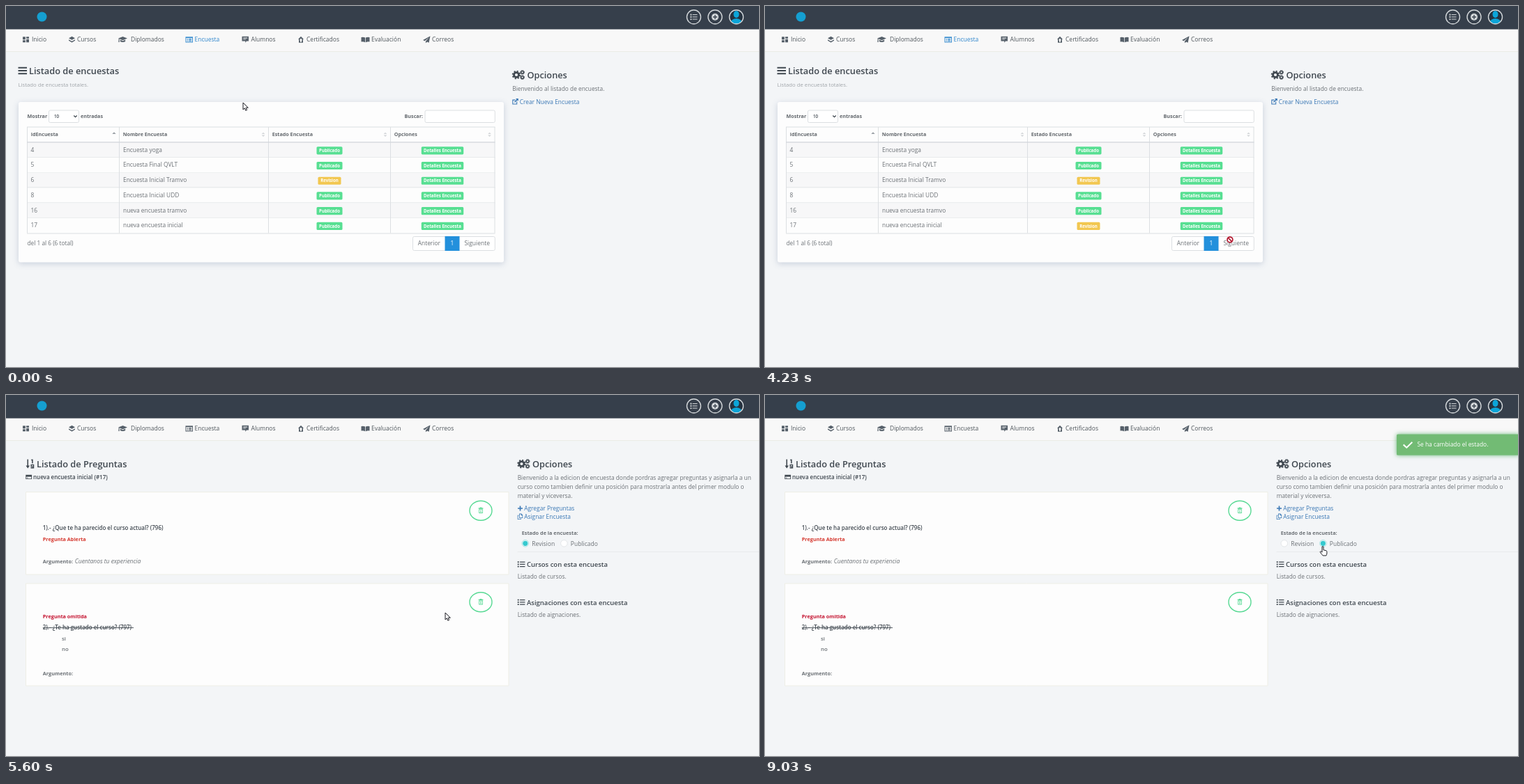
Write an HTML page with a canvas that moves like this. It is 1080 px wide and 519 px high and loops after 9960 ms.

```html
<!DOCTYPE html>
<html lang="es">
<head>
<meta charset="utf-8">
<title>Encuestas</title>
<style>
html, body { margin: 0; width: 100%; height: 100%; overflow: hidden; background: #f3f5f7; }
canvas { display: block; width: 1080px; height: 519px; }
</style>
</head>
<body>
<canvas id="stage"></canvas>
<script>
const W = 1080, H = 519, LOOP = 9960;
const canvas = document.getElementById('stage');
const ctx = canvas.getContext('2d');
const dpr = window.devicePixelRatio || 1;
canvas.width = W * dpr;
canvas.height = H * dpr;

const DARK = '#3f474f', BODY = '#6c7176', LABEL = '#63686d', LINK = '#3b78b5';
const GREEN = '#57df92', YELLOW = '#f2c750', RED = '#d5382f', LINE = '#dcdfe2';

// icon shapes on a 16 x 16 grid
const ICONS = {
  grid: 'M0 0h7v8H0zM9 0h7v5H9zM0 10h7v6H0zM9 7h7v9H9z',
  layers: 'M8 0l8 4.5-8 4.5-8-4.5zM0 8l8 4.5L16 8v2.5L8 15.5 0 10.500z',
  cap: 'M8 1l8 4-8 4.500-8-4.500zM3.500 8.500l4.500 2.500 4.500-2.500v4q-4.500 3-9 0zM.8 6h1.200v8H.4z',
  form: 'M0 1h16v14H0zM1.500 4v9.500h13V4zM3.500 5.500h2v1.500h-2zM7 5.500h6v1.500H7zM3.500 8h2v1.500h-2zM7 8h6v1.500H7zM3.500 10.500h2V12h-2zM7 10.500h6V12H7z',
  board: 'M0 0h16v12h-5l-3 4v-4H0zM3 3v1.600h10V3zM3 6.500v1.600h6V6.500z',
  house: 'M8 0l8 7h-2v9H2V7H0zM8 5l-3.500 3.500L6 12v2h4v-2l1.500-3.500z',
  book: 'M0 2q5-1 7.500 1v12q-3-2-7.500-1.500zM16 2q-5-1-7.500 1v12q3-2 7.500-1.500z',
  plane: 'M16 0L0 9l4 2 9-8-7 9v4l3-3 4 2z',
  bars: 'M0 1h16v2.600H0zM0 6.700h16v2.600H0zM0 12.400h16V15H0z',
  list: 'M0 1h3v3H0zM5 1.500h11v2H5zM0 6.500h3v3H0zM5 7h11v2H5zM0 12h3v3H0zM5 12.500h11v2H5z',
  edit: 'M0 3h8v2H2v9h9V9l2-1v8H0zM9 0h7v7l-2.400-2.400L7 11 5 9l6.400-6.400z',
  plus: 'M6.300 1h3.400v5.300H15v3.400H9.700V15H6.300V9.700H1V6.300h5.300z',
  copy: 'M5 0h7l4 4v8H5zM6.600 1.600v8.800h7.800V5H11V1.600zM0 4h4v1.600H1.600v8.800h7.800V13H11v3H0z',
  sort: 'M2.500 0h2v11h2.500l-3.500 5-3.500-5h2.500zM10 0h3v7h-2V2h-1zM9 9h6v7H9v-1.700h4V13.500H9zM10.700 10.500v1.500h2.500v-1.500z',
  card: 'M0 2h16v12H0zM1.600 7.500v4.900h12.800V7.500zM3 9.500h3V11H3z',
  trash: 'M5.500 0h5v1.500H15V4H1V1.500h4.500zM2 5h12v11H2zM3.700 6.700v7.600h8.600V6.700zM6 8h1.300v5H6zM8.700 8H10v5H8.700z',
  check: 'M1.500 7.500L6 12 14.500 3 16 5 6 15.500 0 9.500z'
};
for (const k in ICONS) ICONS[k] = new Path2D(ICONS[k]);

const ARROW = new Path2D('M0 0v10l2.300-2.100 1.500 3.400 1.800-.8-1.500-3.200h3.200z');
const HAND = new Path2D('M-1 .6q1-1 2 .1v4.600l4 1q1 .4.900 1.500v2.700q-.3 1.700-1 2.900H.2q-2.200-2.300-4-5.200q.2-1.300 1.500-.8l1.300 1.200z');

function text(s, x, y, size, color = BODY, weight = 400, align = 'left', style = '') {
  ctx.font = `${style} ${weight} ${size}px "Open Sans", "Noto Sans", sans-serif`;
  ctx.textAlign = align;
  ctx.fillStyle = color;
  ctx.fillText(s, x, y + size * 0.36);
}

function icon(name, x, y, w, h = w, color = '#56606a') {
  ctx.save();
  ctx.translate(x, y);
  ctx.scale(w / 16, h / 16);
  ctx.fillStyle = color;
  ctx.fill(ICONS[name], 'evenodd');
  ctx.restore();
}

function box(x, y, w, h, fill, stroke, r = 0) {
  ctx.beginPath();
  ctx.roundRect(x, y, w, h, r);
  if (fill) { ctx.fillStyle = fill; ctx.fill(); }
  if (stroke) { ctx.strokeStyle = stroke; ctx.lineWidth = 1; ctx.stroke(); }
}

function disc(x, y, r, fill, stroke, lw = 1, ry = r) {
  ctx.beginPath();
  ctx.ellipse(x, y, r, ry, 0, 0, Math.PI * 2);
  if (fill) { ctx.fillStyle = fill; ctx.fill(); }
  if (stroke) { ctx.strokeStyle = stroke; ctx.lineWidth = lw; ctx.stroke(); }
}

function tri(x, y, w, h, color) {
  ctx.fillStyle = color;
  ctx.beginPath();
  ctx.moveTo(x - w, y);
  ctx.lineTo(x + w, y);
  ctx.lineTo(x, y + h);
  ctx.fill();
}

function gear(x, y, r) {
  disc(x, y, r * 0.58, null, DARK, r * 0.46);
  ctx.save();
  const step = Math.PI * r * 0.9 * 2 / 16;
  ctx.setLineDash([step, step]);
  disc(x, y, r * 0.9, null, DARK, r * 0.3);
  ctx.restore();
}

function gears(x) {
  gear(x + 6, 99, 6);
  gear(x + 14.6, 95.3, 3.3);
  gear(x + 14.6, 102.6, 3.3);
  text('Opciones', x + 21.5, 99.3, 12.75, DARK, 600);
}

const NAV = [
  ['Inicio', 37, 'grid', 24, 9, 8],
  ['Cursos', 102, 'layers', 90, 9, 9],
  ['Diplomados', 179, 'cap', 161, 13, 10],
  ['Encuesta', 270.5, 'form', 257.5, 10.5, 9.5],
  ['Alumnos', 351.5, 'board', 338.5, 9.5, 9],
  ['Certificados', 431, 'house', 419, 8, 9],
  ['Evaluación', 524, 'book', 509.5, 12, 9],
  ['Correos', 611, 'plane', 598, 10.5, 10]
];

function chrome(active) {
  ctx.fillStyle = '#f3f5f7';
  ctx.fillRect(0, 0, W, H);
  ctx.fillStyle = '#f8f8f8';
  ctx.fillRect(0, 33, W, 32);
  ctx.fillStyle = '#ebece5';
  ctx.fillRect(0, 65, W, 1);
  ctx.fillStyle = '#363f4b';
  ctx.fillRect(0, 0, W, 33.5);
  disc(51.5, 15.5, 7, '#159fd1');
  const ring = '#d3d7da';
  disc(986.5, 15.8, 10, null, ring, 1.4);
  icon('list', 981.5, 11, 10, 9.5, ring);
  disc(1017, 15.8, 10, null, ring, 1.4);
  disc(1017, 15.8, 5, ring);
  ctx.fillStyle = '#363f4b';
  ctx.fillRect(1014, 15.1, 6, 1.4);
  ctx.fillRect(1016.3, 12.8, 1.4, 6);
  ctx.save();
  disc(1047.5, 15.8, 10, '#26323f');
  ctx.clip();
  disc(1047.5, 12, 4, '#0ca5d8', null, 1, 5);
  disc(1047.5, 25, 8.5, '#0ca5d8', null, 1, 7);
  ctx.restore();
  disc(1047.5, 15.8, 10, null, ring, 1.4);
  for (const [label, x, name, ix, w, h] of NAV) {
    const on = label === active;
    icon(name, ix, 48.3 - h / 2, w, h, on ? '#3d8fd0' : '#56606a');
    text(label, x, 48, 8.5, on ? '#2f86cc' : '#4f565c');
  }
}

function badge(s, cx, cy, w, color) {
  box(cx - w / 2, cy - 5.6, w, 11.2, color, null, 1.6);
  text(s, cx, cy, 6.1, '#fff', 700, 'center');
}

const ROWS = [
  ['4', 'Encuesta yoga'],
  ['5', 'Encuesta Final QVLT'],
  ['6', 'Encuesta Inicial Tramvo'],
  ['8', 'Encuesta Inicial UDD'],
  ['16', 'nueva encuesta tramvo'],
  ['17', 'nueva encuesta inicial']
];
const COLS = [30.5, 162.5, 376.5, 551.5, 701];
const HEADS = ['idEncuesta', 'Nombre Encuesta', 'Estado Encuesta', 'Opciones'];

function table(t) {
  const top = 196.3, rowH = 21.72;
  ROWS.forEach(([id, name], i) => {
    const y = top + i * rowH;
    ctx.fillStyle = i % 2 ? '#fdfdfd' : '#f7f7f8';
    ctx.fillRect(30.5, y, 670.5, rowH);
    ctx.fillStyle = LINE;
    ctx.fillRect(30, Math.round(y + rowH) - 0.5, 671.5, 1);
    text(id, 35.5, y + 10.4, 8.4);
    text(name, 168, y + 10.4, 8.4);
    const draft = i === 2 || (i === 5 && t >= 3350);
    if (draft) badge('Revision', 464, y + 11.5, 33, YELLOW);
    else badge('Publicado', 464, y + 11.5, 37, GREEN);
    badge('Detalles Encuesta', 626, y + 11.5, 60.5, GREEN);
  });
  ctx.fillStyle = LINE;
  for (const x of COLS) ctx.fillRect(x - 0.5, 174, 1, 152.5);
  ctx.fillRect(30, 173.5, 671.5, 1);
  ctx.fillStyle = '#d3d6dc';
  ctx.fillRect(30, 195.2, 671.5, 1.3);
  HEADS.forEach((s, i) => {
    text(s, COLS[i] + 5.2, 184.7, 7.2, LABEL, 700);
    const x = COLS[i + 1] - 7.5;
    if (!i) tri(x, 184, 2.7, -2.8, '#9aa0a6');
    else {
      tri(x, 184, 2.4, -2.3, '#d2d5d8');
      tri(x, 185.6, 2.4, 2.3, '#d2d5d8');
    }
  });
}

function listPage(t) {
  chrome('Encuesta');
  icon('bars', 17.5, 87, 12.5, 12, DARK);
  text('Listado de encuestas', 33, 93.4, 12.8, DARK, 600);
  text('Listado de encuesta totales.', 17.5, 113.2, 7.75, '#a0a5aa');
  ctx.save();
  ctx.shadowColor = 'rgba(90,110,150,.28)';
  ctx.shadowBlur = 9 * dpr;
  ctx.shadowOffsetY = 2 * dpr;
  box(18, 138, 696, 230.5, '#fdfdfd', null, 3);
  ctx.restore();
  text('Mostrar', 30.5, 158.4, 7.2, LABEL, 700);
  box(61.5, 150, 43, 17.5, '#fff', LINE, 2);
  text('10', 69, 158.7, 6.2, DARK, 600);
  ctx.strokeStyle = DARK;
  ctx.lineWidth = 1.3;
  ctx.beginPath();
  ctx.moveTo(97.3, 157.5);
  ctx.lineTo(99.5, 159.7);
  ctx.lineTo(101.7, 157.5);
  ctx.stroke();
  text('entradas', 107, 158.4, 7.2, LABEL, 700);
  text('Buscar:', 571.5, 158.4, 7.2, LABEL, 700);
  box(601, 150, 100.3, 17.5, '#fff', LINE, 2);
  table(t);
  text('del 1 al 6 (6 total)', 30.5, 340.6, 8.3);
  box(583.5, 331.5, 117.8, 20, '#fff', LINE, 2);
  ctx.fillStyle = '#2390dc';
  ctx.fillRect(629.5, 331, 21, 21);
  text('Anterior', 606.8, 341.2, 8.4, BODY, 400, 'center');
  text('1', 640, 341.2, 8.4, '#fff', 400, 'center');
  text('Siguiente', 675.7, 341.2, 8.5, BODY, 400, 'center');
  gears(726);
  text('Bienvenido al listado de encuesta.', 726.3, 119.2, 8.36);
  icon('edit', 726.3, 133, 8.5, 8.5, LINK);
  text('Crear Nueva Encuesta', 736.7, 137.5, 8.4, LINK);
}

function questionCard(y, h) {
  box(28.5, y, 692.5, h, '#fdfdfd', '#eeeee6');
  disc(681, y + 26.7, 16, '#fff', '#57d993', 1.4, 14);
  icon('trash', 677.3, y + 22, 7.5, 8.5, '#57d993');
}

function radio(x, on) {
  disc(x, 213.3, 4.8, '#fff', on ? '#9fdfe0' : '#e3e6e8');
  if (on) disc(x, 213.3, 3.6, '#35c9cf');
}

function detailPage(t) {
  chrome('');
  icon('sort', 28.5, 92.5, 12.5, 13, DARK);
  text('Listado de Preguntas', 44, 99.3, 12.8, DARK, 600);
  icon('card', 28.3, 113.7, 8.8, 8.3, DARK);
  text('nueva encuesta inicial (#17)', 39, 118, 8, DARK, 600);

  questionCard(139.500, 118.5);
  text('1).- ¿Que te ha parecido el curso actual? (796)', 52.8, 190.7, 7.97, DARK, 600);
  text('Pregunta Abierta', 52.8, 207.8, 7.26, RED, 700);
  text('Argumento:', 52.8, 239.2, 7.3, BODY, 700);
  text('Cuentanos tu experiencia', 98.8, 238.8, 8.5, BODY, 400, 'left', 'italic');

  questionCard(271, 147);
  text('Pregunta omitida', 52.8, 318, 7.26, '#c4122f', 700);
  text('2).- ¿Te ha gustado el curso? (797)', 52.8, 334.2, 7.97, DARK, 600);
  ctx.fillStyle = DARK;
  ctx.fillRect(52.8, 334.2, 130.2, 0.9);
  text('si', 80, 350.6, 7.8, BODY, 600);
  text('no', 80, 365.6, 7.8, BODY, 600);
  text('Argumento:', 52.8, 400.2, 7.3, BODY, 700);

  gears(733.5);
  ['Bienvenido a la edicion de encuesta donde pordras agregar preguntas y asignarla a un',
   'curso como tambien definir una posición para mostrarla antes del primer modulo o',
   'material y viceversa.'].forEach((s, i) => text(s, 733.7, 119.2 + i * 12.9, 8.36));
  icon('plus', 733.5, 159, 8, 8, LINK);
  text('Agregar Preguntas', 743.2, 163.3, 8.4, LINK);
  icon('copy', 733.7, 170.6, 7.5, 8.5, LINK);
  text('Asignar Encuesta', 743.2, 175.2, 8.4, LINK);
  text('Estado de la encuesta:', 739.7, 198.7, 7.3, BODY, 700);
  const published = t >= 7130;
  radio(744.8, !published);
  text('Revision', 754.3, 213.5, 8.5);
  radio(800.4, published);
  text('Publicado', 809.8, 213.5, 8.5);
  ctx.fillStyle = '#e9ebec';
  ctx.fillRect(733.5, 225, W - 733.5, 1);
  icon('list', 733.7, 238.700, 10.7, 9.5, DARK);
  text('Cursos con esta encuesta', 747, 243.8, 9.5, DARK, 600);
  text('Listado de cursos.', 733.7, 261.3, 8.36);
  icon('list', 733.7, 293.2, 10.7, 9.5, DARK);
  text('Asignaciones con esta encuesta', 747, 298.3, 9.5, DARK, 600);
  text('Listado de aignaciones.', 733.7, 315.8, 8.36);
  toast(t);
}

function toast(t) {
  const p = Math.min(1, Math.max(0, (t - 7500) / 1500));
  if (!p) return;
  ctx.save();
  ctx.globalAlpha = 0.5 - Math.cos(p * Math.PI) / 2;
  ctx.shadowColor = 'rgba(60,160,80,.75)';
  ctx.shadowBlur = 6 * dpr;
  box(906, 56.5, 176, 30, '#72bb74', null, 1.5);
  ctx.shadowColor = 'transparent';
  icon('check', 915, 64.5, 14, 13, '#fff');
  text('Se ha cambiado el estado.', 935.5, 71.3, 8.4, '#fff');
  ctx.restore();
}

// time, x, y of the pointer tip
const PATH = [
  [0, 340, 139], [500, 343, 125], [1000, 350, 85], [1400, 352, 51], [1950, 290, 47],
  [2370, 290, 47], [2770, 600, 223], [3330, 690, 290], [3700, 735, 320],
  [4230, 667, 336], [4650, 630, 313], [6230, 630, 313], [6430, 785, 259],
  [6730, 801, 229], [6870, 801, 229], [7050, 800, 217.5], [LOOP, 800, 217.5]
];

function pointer(t) {
  const i = PATH.findIndex(k => k[0] > t);
  const [t0, x0, y0] = PATH[i - 1], [t1, x1, y1] = PATH[i];
  const p = (t - t0) / (t1 - t0);
  return [x0 + (x1 - x0) * p, y0 + (y1 - y0) * p];
}

function shapeAt(t, x, y) {
  if (t < 5330) {
    if (y < 62) return 'hand';
    if (x > 650 && x < 702 && y > 331 && y < 352) return 'no';
    if (x > 596 && x < 656 && y > 310 && y < 322) return 'hand';
    return 'arrow';
  }
  if (x > 733 && y > 254 && y < 268) return 'beam';
  if (x > 795 && y < 220) return 'hand';
  return 'arrow';
}

function cursor(t) {
  const [x, y] = pointer(t), kind = shapeAt(t, x, y);
  ctx.save();
  ctx.translate(x, y);
  ctx.lineJoin = 'round';
  if (kind === 'no') {
    disc(0, 0, 3.9, '#fff', '#b3132b', 1.7);
    ctx.beginPath();
    ctx.moveTo(-2.7, -2.7);
    ctx.lineTo(2.7, 2.7);
    ctx.stroke();
  } else if (kind === 'beam') {
    ctx.fillStyle = '#333';
    ctx.fillRect(-0.5, -4.5, 1, 9.500);
    ctx.fillRect(-2.5, -5, 5, 1);
    ctx.fillRect(-2.5, 4.5, 5, 1);
  } else {
    const shape = kind === 'hand' ? HAND : ARROW;
    ctx.fillStyle = '#fff';
    ctx.strokeStyle = '#1b1b22';
    ctx.lineWidth = 1;
    ctx.fill(shape);
    ctx.stroke(shape);
  }
  ctx.restore();
}

function draw(t) {
  ctx.setTransform(dpr, 0, 0, dpr, 0, 0);
  if (t < 5330) listPage(t);
  else if (t < 5530) {
    ctx.fillStyle = '#020202';
    ctx.fillRect(0, 0, W, H);
  } else detailPage(t);
  cursor(t);
}

const start = performance.now();
function tick() {
  draw((performance.now() - start) % LOOP);
  requestAnimationFrame(tick);
}
tick();
</script>
</body>
</html>
```
